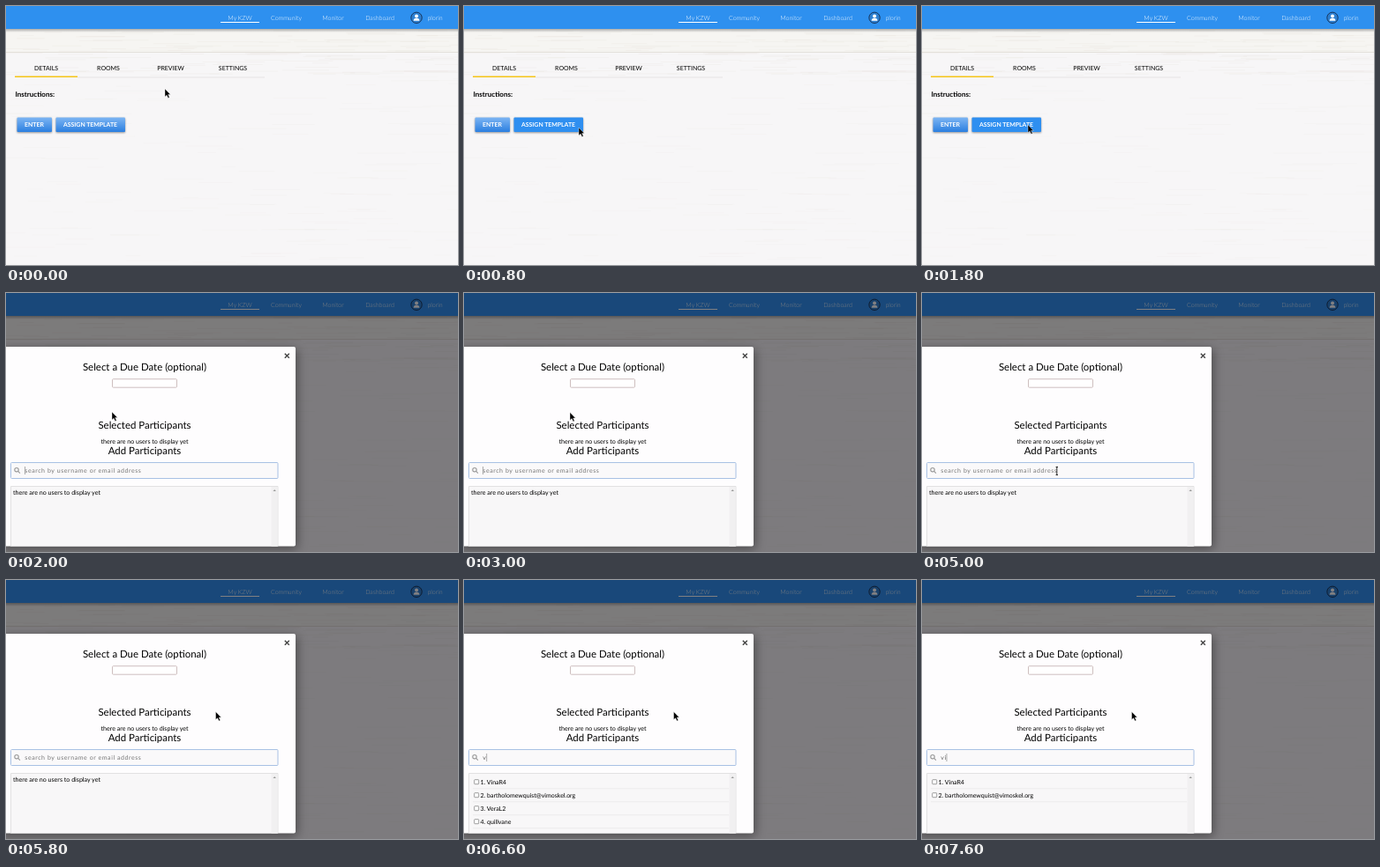
Animation, 512 px wide and 294 px high, one loop 8000 ms. Source, as an HTML page:

```html
<!DOCTYPE html>
<html lang="en">
<head>
<meta charset="utf-8">
<title>Assign template</title>
<style>
  html, body { margin: 0; width: 100%; height: 100%; overflow: hidden; background: #f7f6f7; }
  svg { display: block; width: 100%; height: 100%; font: 7px Lato, sans-serif; text-rendering: geometricPrecision; }
  .mid { text-anchor: middle; }
  .nav { fill: #fff; font-weight: 300; }
  .title { font-size: 11.45px; text-anchor: middle; }
  .note { font-size: 7.1px; }
  .label { fill: #fff; font-size: 6.9px; font-weight: 700; text-anchor: middle; }
  .button { filter: drop-shadow(0 1px 1px #0006); }
  #panel { filter: drop-shadow(2px 3px 6px #0006); }
  #query { letter-spacing: .57px; }
</style>
</head>
<body>
<svg viewBox="0 0 512 294">
  <defs>
    <linearGradient id="blue" x2="0" y2="1">
      <stop stop-color="#7db5f3"/><stop offset="1" stop-color="#2b7fe0"/>
    </linearGradient>
    <linearGradient id="fade" x2="0" y2="1">
      <stop stop-opacity=".3"/><stop offset="1" stop-opacity="0"/>
    </linearGradient>
  </defs>

  <rect width="512" height="294" fill="#f7f6f7"/>
  <rect y="26" width="512" height="26" fill="#f6f5f2"/>
  <g id="grain" stroke="#b9ae98" stroke-width=".6"></g>
  <path d="M0 52.5H512" stroke="#e3e0da"/>

  <g class="mid">
    <text x="45.5" y="73">DETAILS</text>
    <text x="116" y="73">ROOMS</text>
    <text x="186.5" y="73">PREVIEW</text>
    <text x="257" y="73">SETTINGS</text>
  </g>
  <path d="M81 81H293" stroke="#dedcdc" stroke-width=".7"/>
  <path d="M10 80.3H81" stroke="#f5c518" stroke-width="1.6"/>
  <text x="10.5" y="103" font-size="8" font-weight="700">Instructions:</text>
  <rect class="button" x="12.5" y="126.5" width="39.5" height="16.5" rx="1" fill="url(#blue)"/>
  <text class="label" x="32" y="137.3">ENTER</text>
  <rect id="assign" class="button" x="56.5" y="126.5" width="78.5" height="16.5" rx="1"/>
  <text class="label" x="95.5" y="137.3">ASSIGN TEMPLATE</text>

  <rect y="26" width="512" height="4" fill="url(#fade)"/>
  <rect width="512" height="26" fill="#2e90ef"/>
  <g class="nav mid">
    <text x="265" y="16">My KZW</text>
    <text x="317.5" y="16">Community</text>
    <text x="370.5" y="16">Monitor</text>
    <text x="423.5" y="16">Dashboard</text>
    <text x="486" y="16">plorin</text>
  </g>
  <path d="M243 18.5H287" stroke="#fff" stroke-width="1.2"/>
  <circle cx="465" cy="13.3" r="6.2" fill="#2e80d2" stroke="#17355c"/>
  <path d="M461.6 16.8q0-3 3.4-3t3.4 3z" fill="#fff"/>
  <circle cx="465" cy="11.4" r="2" fill="#fff"/>

  <g id="modal">
    <rect width="512" height="294" fill="#040206" opacity=".5"/>
    <rect id="panel" x="-8" y="61" width="336" height="226.5" rx="2" fill="#fefdfe"/>
    <path d="M315.8 68.7l5 5m0-5l-5 5" stroke="#444" stroke-width="1.4"/>
    <text class="title" x="157" y="88">Select a Due Date (optional)</text>
    <rect x="120.5" y="97.7" width="73" height="9.5" rx="1" fill="#fff" stroke="#c9b8b8" stroke-width=".9"/>
    <text class="title" x="157" y="154">Selected Participants</text>
    <text class="note mid" x="157" y="170.5">there are no users to display yet</text>
    <text class="title" x="157" y="183">Add Participants</text>

    <rect x="5.5" y="192.5" width="302.5" height="18" rx="1" fill="#faf9fa" stroke="#a8c1e4"/>
    <g fill="none" stroke="#999" stroke-width="1.1">
      <circle cx="12" cy="200.7" r="2.2"/><path d="M13.7 202.4l2.2 2.2"/>
    </g>
    <text id="query" x="21.3" y="204"></text>
    <path id="caret" d="M0 197V206" stroke="#888" stroke-width=".7"/>

    <path d="M5.5 287.5V219.5H308V287.5" fill="#f8f7f8" stroke="#dcdbdc" stroke-width=".8"/>
    <rect x="300.5" y="220" width="7" height="67.5" fill="#f1f0f1"/>
    <path d="M302.5 225l1.7-2 1.7 2z" fill="#999"/>
    <text id="empty" class="note" x="8" y="228.5">there are no users to display yet</text>
    <g id="results"></g>
  </g>

  <path id="arrow" d="M0 0V9L2.1 7.2 3.7 10.5 5.2 9.8 3.7 6.6H6.3z" stroke="#fff" stroke-width=".4"/>
  <path id="beam" d="M-1.2-4.5H1.2M0-4.5V4.5M-1.2 4.5H1.2" stroke="#111" stroke-width=".9"/>
</svg>
<script>
const LOOP = 8000, STEP = 200;
const $ = id => document.getElementById(id);
const show = (id, on) => $(id).style.display = on ? '' : 'none';

// Pointer stops: time, x, y
const pointerPath = [
  [400, 180, 94], [600, 164, 106], [800, 130, 138], [1000, 120, 134.5], [3200, 120, 135.5],
  [3600, 121.5, 139], [3800, 121.5, 139], [4400, 152, 202], [4800, 152, 202],
  [5000, 152.8, 202], [5800, 237.5, 149.5]
];
const caretOn = [[2000, 2400], [3000, 3400], [4000, 4400], [5200, 5600], [6200, 7000], [7400, LOOP]];
const matchesV = ['VinaR4', 'bartholomewquist@vimoskel.org', 'VeraL2', 'quillvane'];
const within = (t, [from, to]) => t >= from && t < to;

function pointerAt(t) {
  const next = pointerPath.findIndex(stop => stop[0] > t);
  if (next === 0) return pointerPath[0].slice(1);
  if (next < 0) return pointerPath.at(-1).slice(1);
  const [t0, x0, y0] = pointerPath[next - 1], [t1, x1, y1] = pointerPath[next];
  const k = (t - t0) / (t1 - t0);
  return [x0 + (x1 - x0) * k, y0 + (y1 - y0) * k];
}

function drawGrain() {
  let seed = 7;
  const random = () => (seed = seed * 16807 % 2147483647) / 2147483647;
  let lines = '';
  for (let i = 0; i < 240; i++) {
    const upper = i < 110;
    const y = upper ? 28 + random() * 52 : 80 + random() * 214;
    lines += `<path d="M${random() * 540 - 30} ${y}h${15 + random() * 60}" opacity="${upper ? .12 : .06}"/>`;
  }
  $('grain').innerHTML = lines;
}

function buildResults() {
  $('results').innerHTML = matchesV.map((name, i) => `<g transform="translate(0 ${i * 15})">
    <rect x="11.7" y="226.7" width="5" height="5" rx=".6" fill="#fff" stroke="#777" stroke-width=".7"/>
    <text x="18.5" y="231.8">${i + 1}. ${name}</text>
    <path d="M10 236.8H300" stroke="#e6e5e6" stroke-width=".7"/></g>`).join('');
}

function render(t) {
  const listed = t >= 6400;
  const typed = t >= 7400 ? 'vi' : t >= 6200 ? 'v' : '';
  show('modal', t >= 2000);
  $('assign').setAttribute('fill', t >= 800 ? '#2f8ff0' : 'url(#blue)');

  const query = $('query');
  query.textContent = typed || 'search by username or email address';
  query.setAttribute('fill', typed ? '#666' : '#777');
  const caretX = typed ? 21.5 + query.getComputedTextLength() : 21.5;
  $('caret').setAttribute('transform', `translate(${caretX})`);
  show('caret', caretOn.some(span => within(t, span)));

  show('empty', !listed);
  show('results', listed);
  [...$('results').children].forEach((row, i) => row.style.display = t >= 7600 && i > 1 ? 'none' : '');

  const overField = within(t, [4400, 5200]);
  const place = `translate(${pointerAt(t)})`;
  for (const id of ['arrow', 'beam']) $(id).setAttribute('transform', place);
  show('arrow', !overField);
  show('beam', overField);
}

function tick() {
  const t = performance.now() % LOOP;
  render(Math.floor(t / STEP) * STEP);
  requestAnimationFrame(tick);
}

drawGrain();
buildResults();
tick();
</script>
</body>
</html>
```
